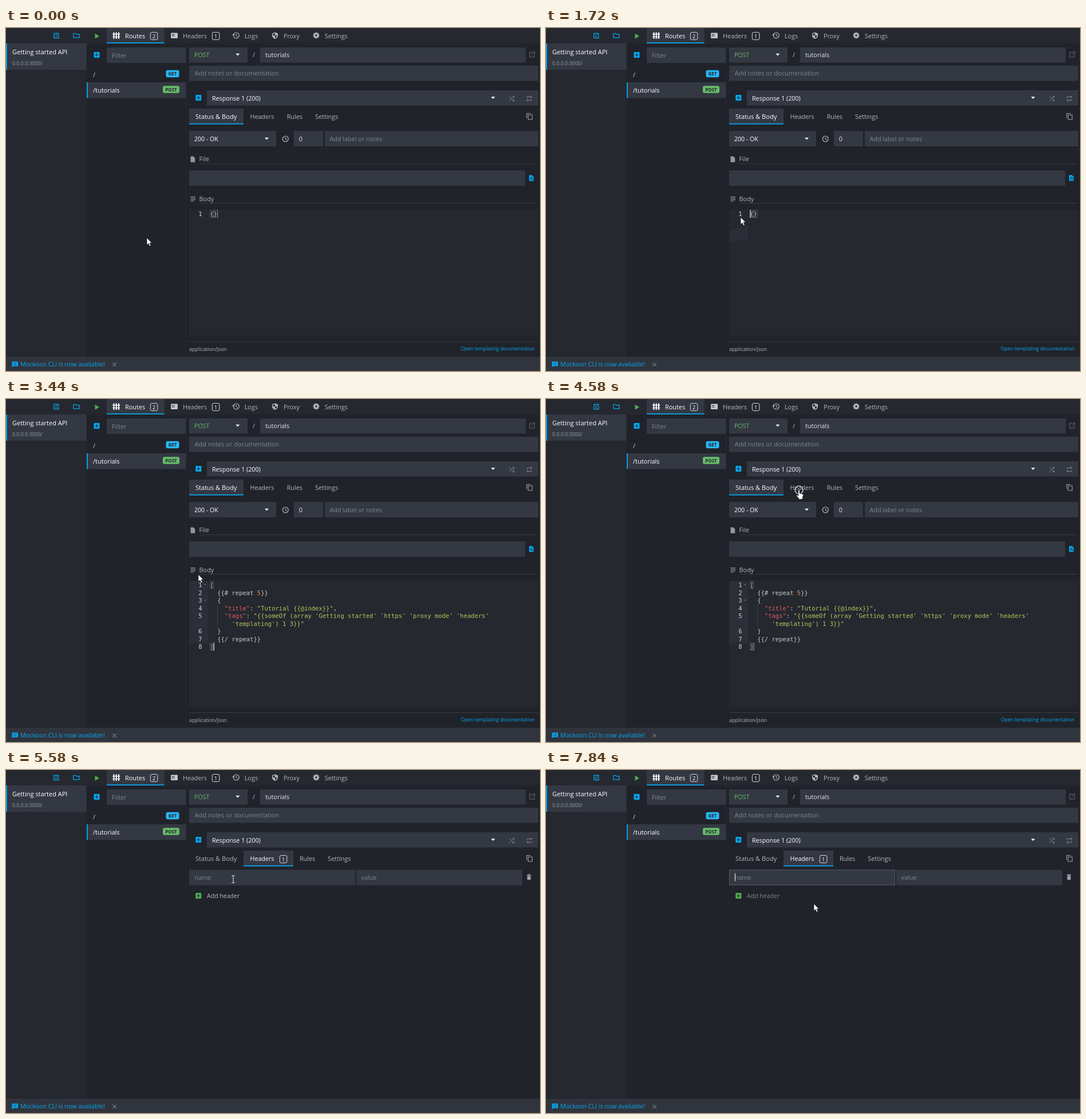
An HTML page that plays this animation: 933 by 600 pixels, repeating every 8000 ms.

```html
<!DOCTYPE html>
<html lang="en">
<head>
<meta charset="utf-8">
<title>Route editor</title>
<style>
html, body { margin: 0; width: 100%; height: 100%; overflow: hidden; background: #20232a; }
svg { display: block; width: 100%; height: 100%; }
text { font-family: "Open Sans", "Noto Sans", sans-serif; white-space: pre; }
.code text { font-family: "DejaVu Sans Mono", "Liberation Mono", monospace; font-size: 10.52px; }
</style>
</head>
<body>
<svg id="stage" viewBox="0 0 933 600" xmlns="http://www.w3.org/2000/svg"></svg>
<script>
const LOOP = 8000;
const C = {
  page: '#20232a', side: '#25282f', field: '#343842', bar: '#30343d', line: '#373b43',
  blue: '#03a9f4', green: '#4caf50', white: '#fff', text: '#b3b7be', dim: '#7f848e',
  code: '#c5c8c6', str: '#b9c45c', key: '#e0575f', num: '#de935f'
};

const rect = (x, y, w, h, fill, more = '') =>
  `<rect x="${x}" y="${y}" width="${w}" height="${h}" fill="${fill}" ${more}/>`;
const text = (x, y, s, fill = C.text, size = 10.9, more = '') =>
  `<text x="${x}" y="${y}" fill="${fill}" font-size="${size}" ${more}>${s.replace(/&/g, '&amp;')}</text>`;
const fill = (d, color, more = '') => `<path d="${d}" fill="${color}" ${more}/>`;
const stroke = (d, color, w = 1.2) => `<path d="${d}" fill="none" stroke="${color}" stroke-width="${w}"/>`;
const group = (id, content, more = '') => `<g id="${id}" ${more}>${content}</g>`;
const box = (x, y, w, h) => rect(x, y, w, h, C.field);
const arrowDown = (x, y) => fill(`M${x - 3.5} ${y - 1.8}h7l-3.5 3.8z`, C.white);
const plus = (x, y, color) => rect(x - 5, y - 5, 10, 10, color, 'rx="1"') +
  stroke(`M${x - 3} ${y}h6M${x} ${y - 3}v6`, C.page);
const count = (x, y, n) =>
  `<rect x="${x}" y="${y}" width="12.5" height="13" rx="2.5" fill="none" stroke="#d5d7db"/>` +
  text(x + 6.25, y + 10, n, C.white, 9, 'text-anchor="middle"');
const badge = (x, y, w, s, color) => rect(x, y, w, 12.5, color, 'rx="3"') +
  text(x + w / 2, y + 9.3, s, '#20242b', 8, 'text-anchor="middle" font-weight="700"');
const clock = (x, y, color) =>
  `<circle cx="${x}" cy="${y}" r="5" fill="none" stroke="${color}" stroke-width="1.2"/>` +
  stroke(`M${x} ${y - 3}v3.3l2.4 1.5`, color, 1.1);
const tab = (x, w, y, h) => box(x, y, w, h) + rect(x, y + h - 1.7, w, 1.7, C.blue);

function gear(x, y, color) {
  let teeth = '';
  for (let i = 0; i < 8; i++)
    teeth += rect(x - 1.3, y - 5.4, 2.6, 3, color, `transform="rotate(${i * 45} ${x} ${y})"`);
  return teeth + `<circle cx="${x}" cy="${y}" r="2.9" fill="none" stroke="${color}" stroke-width="2.4"/>`;
}

function topBar() {
  return rect(0, 0, 933, 27, C.side) + tab(176, 100.5, 0, 27) +
    stroke('M90 9.3h-6.300v8.400h8.400v-5', C.blue) +
    stroke('M85.500 12.500h4M85.500 15h4.500M91 8v4.500M88.800 10.200h4.500', C.blue, 1) +
    stroke('M117.800 16.800V9.500h4l1.200 1.400h5v5.900z', C.blue) +
    fill('M155.500 9.800l7.500 4.500-7.500 4.500z', C.green) +
    stroke('M188.500 7.500v11.500M192.700 7.500v11.500M196.900 7.500v11.500', C.white, 2) +
    stroke('M186 10.800h13.300M186 15.500h13.300', C.white, 1.2) +
    text(208, 17.5, 'Routes', C.white) + count(252.3, 7.5, '2') +
    rect(288, 8.500, 12, 9.500, '#c3c6cb', 'rx="1"') + stroke('M289.500 11.500h5M289.500 14h5', C.side, 1) +
    text(309, 17.5, 'Headers', C.text, 10.7) + count(360.3, 7.5, '1') +
    clock(402.3, 13, C.text) + fill('M395.300 11h4.400l-2.200 3z', C.text) + text(416.7, 17.5, 'Logs') +
    fill('M470 7.500l5 2v3.500q0 4.200-5 6-5-1.800-5-6V9.500z', C.text) +
    fill('M470 9v4h-3.600v-2.500zM470 13h3.600q-.4 2.900-3.600 4.400z', C.side) +
    text(485, 17.5, 'Proxy', C.text, 10.7) + gear(542, 13, C.text) + text(556.7, 17.5, 'Settings');
}

function sidebars() {
  return rect(0, 27, 140.5, 548, C.side) + box(0, 27, 140.500, 46) + rect(0, 27, 1.8, 46, C.blue) +
    text(11, 45.5, 'Getting started API', C.white, 11) + text(11, 64.5, '0.0.0.0:3000/', '#989da6', 8.8) +
    plus(158.5, 47, C.blue) + box(176, 34, 138, 27) + text(185, 51.8, 'Filter', C.dim) +
    text(152, 86, '/', '#d0d3d8') + badge(279.5, 73.7, 23, 'GET', '#29b6f6') +
    box(141, 95, 173, 27.5) + rect(141, 95, 1.8, 27.5, C.blue) +
    text(152, 113, '/tutorials', C.white, 11) + badge(274, 101.3, 29, 'POST', '#66bb6a') +
    rect(314, 27, 1, 548, '#282b33');
}

function routeBar() {
  return box(320, 34, 102, 26.5) + text(329, 51, 'POST', '#66bb6a', 10.7) + arrowDown(404.8, 46.5) +
    text(431, 51, '/') + box(444, 34, 464, 26.500) + text(453, 51, 'tutorials', '#e3e5e8') +
    stroke('M919 42.500h-4v8.500h8.500v-4M920 42h3.700v3.700M923.500 42.200l-5 5', '#686d76', 1) +
    box(320, 66, 610, 26.5) + text(329.5, 83, 'Add notes or documentation', C.dim, 11) +
    plus(336.3, 122, C.blue) + box(351, 109, 579, 26.5) +
    text(360, 126.7, 'Response 1 (200)', C.white, 10.7) + arrowDown(851, 122) +
    stroke('M879.500 119.500l8 8M879.500 127.500l8-8M884.800 119.300h2.900v2.900M884.800 127.700h2.900v-2.900', C.dim, 1) +
    stroke('M910.500 122.500v-2h8M916.500 118l2.300 2.400-2.300 2.300M918.300 124.500v2h-8M912.300 124l-2.300 2.400 2.300 2.300', C.dim, 1) +
    stroke('M909.800 157.500v-8h7M912.300 152h7v8h-7z', '#a0a4ac', 1.1);
}

function bottomBar() {
  return rect(0, 575, 933, 25, C.bar) +
    fill('M10.500 583.500h10.500v8h-8.300l-2.200 2.200z', C.blue) +
    stroke('M12.300 586h1.300M14.500 586h4.700M12.300 588.800h1.300M14.500 588.800h3.500', C.bar, 1) +
    text(25, 592.3, 'Mockoon CLI is now available!', C.blue, 10.68) +
    stroke('M186.300 585.500l6.500 6.500M192.800 585.500l-6.500 6.500', '#a0a4ac', 1);
}

const lineY = i => 329 + 13.5 * i;
const code = (row, col, ...parts) =>
  `<text x="${356.5 + col * 6.333}" y="${lineY(row)}">` +
  parts.map(([s, color]) => `<tspan fill="${color || C.code}">${s}</tspan>`).join('') + '</text>';
const bracket = (x, row) =>
  `<rect x="${x}" y="${lineY(row) - 10.500}" width="6.300" height="13" fill="none" stroke="#555a61" stroke-width=".8"/>`;
const lineNo = (n, row) => `<text x="342.500" y="${lineY(row)}" text-anchor="end" fill="#d0d2d5">${n}</text>`;
const fold = row => fill(`M345.800 ${lineY(row) - 5}h4l-2 2.300z`, '#686c74');

function editor() {
  const before = bracket(356.5, 0) + bracket(363, 0) + code(0, 0, ['{}']);
  const after = bracket(356.5, 0) + bracket(356.5, 8) + fold(0) + fold(2) +
    stroke('M369.500 358v41', '#3a3e46', 1) +
    [2, 3, 4, 5].map(n => lineNo(n, n - 1)).join('') + [6, 7, 8].map(n => lineNo(n, n)).join('') +
    code(0, 0, ['[']) + code(1, 2, ['{{# repeat '], ['5', C.num], ['}}']) + code(2, 2, ['{']) +
    code(3, 4, ['"title"', C.key], [': '], ['"Tutorial {{@index}}"', C.str], [',']) +
    code(4, 4, ['"tags"', C.key], [': '],
      ['"{{someOf (array \'Getting started\' \'https\' \'proxy mode\' \'headers\'', C.str]) +
    code(5, 6, ["'templating') 1 3}}\"", C.str]) +
    code(6, 2, ['}']) + code(7, 2, ['{{/ repeat}}']) + code(8, 0, [']']);
  return rect(320, 318, 610, 220, C.side) +
    group('trail', fill('M320 355l33-10v25.500l-20 1V373h-13z', '#2b2e36')) +
    group('gutter', rect(320, 318.500, 33, 109, '#2c2f37')) +
    group('lines', lineNo(1, 0) + group('before', before) + group('after', after), 'class="code"') +
    '<rect id="caret" width="1.200" height="13.500" fill="#f0f0f0"/>';
}

function bodyPane() {
  return tab(320, 95, 141, 27.5) + text(331, 159.3, 'Status & Body', C.white, 11.1) +
    text(426.500, 159.3, 'Headers', C.text, 10.7) +
    text(490.700, 159.3, 'Rules', C.text, 10.8) + text(540, 159.3, 'Settings') +
    box(320, 180, 152, 27) + text(329, 197.7, '200 - OK', C.white, 10.6) + arrowDown(455.5, 193.5) +
    clock(488.3, 194, C.text) + box(503, 180, 51, 27) + text(511.800, 197.7, '0', '#e3e5e8') +
    box(557, 180, 373, 27) + text(565.500, 197.7, 'Add label or notes', C.dim, 10.8) +
    fill('M322.500 224.500h4.800l2.900 3v7.300h-7.700z', '#92969f') + text(337.500, 233.3, 'File') +
    rect(338, 237, 590, 1, C.line) + box(320, 249, 587, 27) +
    fill('M914 257.200h5l3 3v7.300h-8z', C.blue) +
    `<circle cx="918" cy="262.800" r="1.900" fill="none" stroke="${C.page}"/>` + stroke('M919.300 264.200l2 2', C.page, 1) +
    stroke('M322.500 295.500h8.500M322.500 298h8.500M322.500 300.500h8.500M322.500 303h5.500', '#a0a4ac', 1) +
    text(337.500, 302.5, 'Body') + rect(338, 306, 590, 1, C.line) + editor() +
    rect(320, 548, 610, 1, C.line) + text(320, 565.300, 'application/json', C.text, 8.85) +
    text(794.700, 563.700, 'Open templating documentation', C.blue, 8.45);
}

function headersPane() {
  const trash = stroke('M910 184h7.500M912.200 183h3', '#a0a4ac', 1.3) + fill('M910.700 185.500h6v6.500h-6z', '#a0a4ac');
  const row = count(478.300, 149.5, '1') + box(320, 174.500, 290, 27) + box(612, 174.500, 290, 27) +
    '<rect id="focus" x="320.500" y="175" width="289" height="26" fill="none" stroke="#555b69"/>' +
    text(329.500, 192.2, 'name', C.dim) + text(620.500, 192.2, 'value', C.dim) + trash +
    '<rect id="nameCaret" x="329.800" y="180.500" width="1.100" height="14" fill="#f0f0f0"/>';
  return '<g id="activeTab"></g>' +
    text(331, 159.3, 'Status & Body', C.text, 11.1) + text(426.500, 159.3, 'Headers', C.white, 10.7) +
    group('moreTabs', text(490.700, 159.3, 'Rules', C.text, 10.8) + text(540, 159.3, 'Settings')) +
    group('row', row) +
    group('add', plus(336.300, 193, C.green) + text(351, 197.3, 'Add header', C.dim, 10.55, 'id="addText"'));
}

function pointer() {
  return '<circle id="ring" cx="442" cy="159" r="7" fill="none" stroke="#f4f4f4" stroke-width="1.200"/>' +
    group('arrow', fill('M0 0V12.500L2.900 9.900 5 14.600 7.200 13.600 5.100 9H9z', '#fff', 'stroke="#111" stroke-width=".7"')) +
    group('beam', stroke('M-2.800 -6.200h2l.8.800.800-.800h2M0 -5.500V5.500M-2.800 6.200h2l.8-.8.800.800h2', '#d8dade', 1.1)) +
    group('hand', fill('M-1.300 .5Q0 -1 1.300 .5V6l5 1.200Q7.800 7.800 7.500 9.500L6.500 13v3.500H-.5V15L-4.500 10.200Q-5 8.500-3.300 8.700L-1.300 10.300z',
      '#fff', 'stroke="#111" stroke-width=".8"'));
}

document.getElementById('stage').innerHTML = rect(0, 0, 933, 600, C.page) + topBar() + sidebars() +
  routeBar() + group('bodyPane', bodyPane()) + group('headersPane', headersPane()) + bottomBar() + pointer();

const el = {};
document.querySelectorAll('#stage [id]').forEach(e => el[e.id] = e);
const show = (id, on) => el[id].setAttribute('display', on ? 'inline' : 'none');
const set = (id, name, value) => el[id].setAttribute(name, value);

// Pointer stops: time, x, y
const path = [
  [390, 246, 367], [1170, 374, 335], [1230, 374, 335], [1470, 348, 335], [1640, 347, 334],
  [1715, 340, 331], [1780, 340, 331], [2010, 332, 355], [3190, 332, 355], [3435, 336, 307],
  [3520, 336, 307], [3990, 460, 176], [4330, 442, 159], [4950, 442, 159], [5175, 419, 181],
  [5280, 419, 181], [5380, 395, 191], [5575, 397, 191], [5660, 397, 191], [5750, 399, 206],
  [6140, 403, 242], [6400, 403, 242], [7060, 468, 234]
];
function pointerAt(t) {
  const i = path.findIndex(p => p[0] > t);
  if (i < 0) return path[path.length - 1].slice(1);
  if (i === 0) return path[0].slice(1);
  const [t0, x0, y0] = path[i - 1], [t1, x1, y1] = path[i];
  const k = (t - t0) / (t1 - t0);
  return [x0 + (x1 - x0) * k, y0 + (y1 - y0) * k];
}

const PASTE = 2320, SWITCH = 4700, ADD = 5440, FOCUS = 5720;
const within = (v, a, b) => v >= a && v < b;

function shapeAt(x, y, t) {
  if (t < SWITCH) {
    if (y > 318 && x > 353 || within(y, 249, 276) && x > 320) return 'beam';
    return within(y, 141, 168) && within(x, 415, 480) ? 'hand' : 'arrow';
  }
  if (y < 168) return 'hand';
  const top = t < ADD ? 187 : 210;
  if (within(y, top, top + 24) && x < 409) return 'hand';
  return t >= ADD && within(y, 174, 202) ? 'beam' : 'arrow';
}

function update(t) {
  const inBody = t < SWITCH, pasted = t >= PASTE, added = t >= ADD;
  show('bodyPane', inBody);
  show('headersPane', !inBody);

  show('trail', within(t, 1000, 3240));
  show('gutter', t >= 3240);
  show('before', !pasted);
  show('after', pasted);
  const caretX = pasted ? 362.6 : t < 1400 ? 369 : 356.5;
  const caretOn = within(t, 1240, 2900) || within(t, 3420, 3960);
  set('caret', 'x', caretX);
  set('caret', 'y', pasted ? 426.5 : 318.5);
  set('caret', 'opacity', caretOn ? 1 : 0.4);

  el.activeTab.innerHTML = tab(415, added ? 87 : 65, 141, 27.5);
  set('moreTabs', 'transform', `translate(${added ? 22.2 : 0} 0)`);
  set('add', 'transform', `translate(0 ${added ? 27 : 0})`);
  set('addText', 'fill', within(t, 5300, 6050) ? C.text : C.dim);
  show('row', added);
  show('focus', t >= FOCUS);
  show('nameCaret', within(t, FOCUS, 6450) || within(t, 6760, 7290) || t >= 7840);

  const [x, y] = pointerAt(t), shape = shapeAt(x, y, t);
  for (const id of ['arrow', 'beam', 'hand']) {
    show(id, id === shape);
    set(id, 'transform', `translate(${x} ${y})`);
  }
  show('ring', within(t, 4580, 4820));
}

const start = performance.now();
function tick(now) {
  update(Math.max(0, now - start) % LOOP);
  requestAnimationFrame(tick);
}
update(0);
requestAnimationFrame(tick);
</script>
</body>
</html>
```
